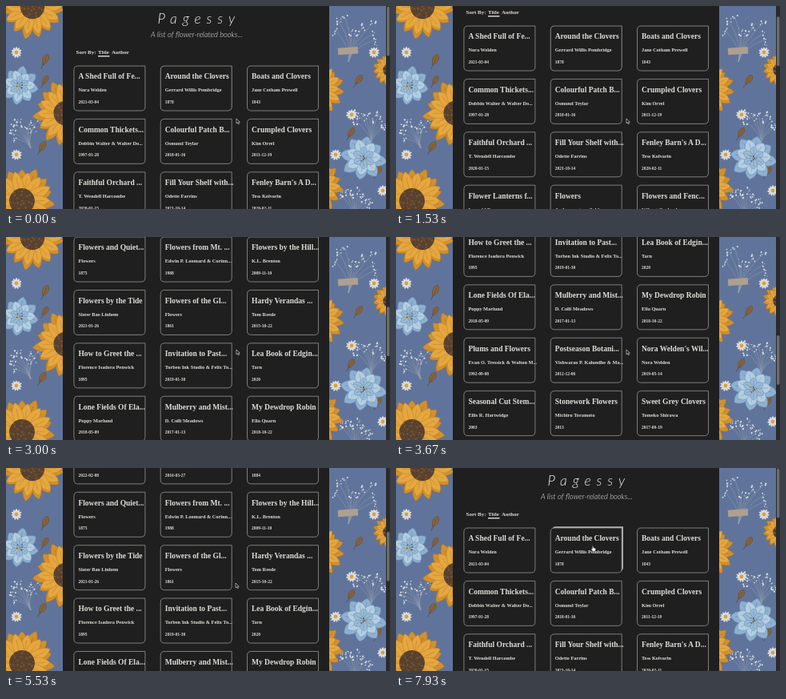
These frames come from a looping animation (480x254 px, 8 s). An HTML page:

```html
<!DOCTYPE html>
<html lang="en">
<head>
<meta charset="utf-8">
<title>Pagessy</title>
<style>
  html, body { margin: 0; width: 100%; height: 100%; overflow: hidden; background: #1f1f1f; }
  svg { display: block; width: 100vw; height: 100vh; }
  text { fill: #dfddd8; font-family: "Liberation Serif", "Noto Serif", serif; font-weight: 700; white-space: pre; }
  .brand, .tag { font-family: Lato, "Open Sans", sans-serif; font-style: italic; font-weight: 300; fill: #f4f4f4; }
  .brand { font-size: 17.5px; letter-spacing: 6.9px; }
  .tag { font-size: 9.4px; }
  .sort { font-size: 7px; }
  .name { font-size: 9.5px; }
  .by { font-size: 6.3px; }
  .date { font-size: 5.5px; }
</style>
</head>
<body>
<svg id="stage" viewBox="0 0 480 254" preserveAspectRatio="none"></svg>
<script>
const NS = "http://www.w3.org/2000/svg";
const LOOP = 8000, STEP = 1000 / 15;
const stage = document.getElementById("stage");

function add(parent, tag, attrs, text) {
  const el = document.createElementNS(NS, tag);
  for (const k in attrs) el.setAttribute(k, attrs[k]);
  if (text) el.textContent = text;
  parent.appendChild(el);
  return el;
}

let seed = 11;
const rnd = () => (seed = (seed * 16807) % 2147483647) / 2147483647;

// ---- wallpaper ----
const wall = add(stage, "g", {});
add(wall, "rect", { width: 480, height: 254, fill: "#60749b" });

function petals(g, n, r, w, fill, line, turn) {
  for (let i = 0; i < n; i++) {
    const len = r * (0.88 + 0.14 * rnd());
    add(g, "path", {
      d: `M0 0C${-w} ${-len * 0.4} ${-w} ${-len * 0.8} 0 ${-len}C${w} ${-len * 0.8} ${w} ${-len * 0.4} 0 0M0 0V${-len * 0.8}`,
      transform: `rotate(${turn + i * 360 / n})`, fill, stroke: line, "stroke-width": 0.5
    });
  }
}
const at = (x, y, turn = 0) => add(wall, "g", { transform: `translate(${x} ${y}) rotate(${turn})` });

function sunflower(x, y, r) {
  const g = at(x, y);
  petals(g, 15, r, r * 0.22, "#d0912f", "#a86a20", 0);
  petals(g, 14, r * 0.9, r * 0.2, "#e5a73f", "#bf7f28", 12);
  add(g, "circle", { r: r * 0.37, fill: "#5d4430" });
  // seeds on a golden-angle spiral
  for (let i = 0; i < 60; i++) {
    const d = r * 0.36 * Math.sqrt(i / 60), a = i * 2.4;
    add(g, "circle", { cx: d * Math.cos(a), cy: d * Math.sin(a), r: 0.65, fill: i % 3 ? "#3f3027" : "#a8742f" });
  }
}
function blueFlower(x, y, r) {
  const g = at(x, y);
  petals(g, 8, r, r * 0.34, "#8fb0d0", "#5d82aa", 10);
  petals(g, 7, r * 0.82, r * 0.3, "#b4cee2", "#7296ba", 35);
  petals(g, 6, r * 0.5, r * 0.2, "#9bbad6", "#6389b0", 0);
  for (let i = 0; i < 12; i++)
    add(g, "circle", { cx: (rnd() - 0.5) * r * 0.35, cy: (rnd() - 0.5) * r * 0.35, r: 0.9, fill: i % 2 ? "#c9ab62" : "#4a5a70" });
}
function daisy(x, y, r) {
  const g = at(x, y);
  petals(g, 11, r, r * 0.22, "#eeece6", "#cfd0d4", 0);
  add(g, "circle", { r: r * 0.34, fill: "#d9a23a" });
}
function leaf(x, y, turn, len) {
  const g = at(x, y, turn);
  petals(g, 1, len, len * 0.32, "#8a6439", "#5f4730", 0);
  add(g, "path", { d: "M0 5V0", stroke: "#5f4730", "stroke-width": 0.7 });
}
function spray(x, y, turn, len) {
  const g = at(x, y, turn);
  for (let i = 0; i < 9; i++) {
    const a = (i - 4) * 0.16, l = len * (0.65 + 0.35 * rnd());
    const tx = Math.sin(a) * l, ty = -Math.cos(a) * l;
    add(g, "path", { d: `M0 0Q0 ${ty * 0.5} ${tx} ${ty}`, fill: "none", stroke: "#98a0ab", "stroke-width": 0.45 });
    for (let k = 0; k < 5; k++)
      add(g, "circle", { cx: tx + (rnd() - 0.5) * 7, cy: ty + (rnd() - 0.3) * 11, r: 0.5 + rnd() * 0.7, fill: "#d9dce0" });
  }
}

spray(31, 178, -22, 38);
leaf(46, 74, 25, 15);
leaf(46, 98, 30, 13);
leaf(42, 182, 30, 15);
sunflower(33, 1, 41);
daisy(13, 58, 7);
blueFlower(17, 100, 25);
sunflower(75, 134, 42);
daisy(13, 186, 7);
sunflower(20, 244, 43);

spray(428, 70, 14, 58);
spray(456, 174, 5, 46);
spray(434, 268, 10, 42);
add(wall, "rect", { x: 415, y: 52, width: 25, height: 8.5, fill: "#ada091", transform: "rotate(-4 427 56)" });
daisy(460, 58, 7);
leaf(437, 98, 35, 14);
leaf(428, 164, 30, 14);
leaf(462, 212, 25, 14);
sunflower(479, 80, 21);
sunflower(388, 104, 35);
daisy(432, 136, 7);
daisy(412, 186, 7);
blueFlower(447, 190, 29);
sunflower(387, 226, 35);
daisy(471, 231, 7);

// ---- page ----
add(stage, "rect", { x: 71, width: 333, height: 254, fill: "#1f1f1f" });
const page = add(stage, "g", {});
const label = (parent, cls, x, y, s) => add(parent, "text", { class: cls, x, y }, s);

label(page, "brand", 189.5, 22, "Pagessy");
label(page, "tag", 181, 38.5, "A list of flower-related books...");
label(page, "sort", 87.5, 60.3, "Sort By:");
label(page, "sort", 115, 60.3, "Title");
label(page, "sort", 132, 60.3, "Author");
add(page, "rect", { x: 115, y: 62.2, width: 14.5, height: 1.2, fill: "#fff" });

const NA = "Authors not available";
const books = `A Shed Full of Fe...|Nora Welden|2021-03-04
Around the Clovers|Gerrard Willis Pembridge|1878
Boats and Clovers|Jane Cotham Prewell|1843
Common Thickets...|Dobbin Walter & Walter Do...|1997-01-28
Colourful Patch B...|Osmund Teylar|2018-01-16
Crumpled Clovers|Kim Orrel|2011-12-19
Faithful Orchard ...|T. Wendell Harcombe|2020-01-15
Fill Your Shelf with...|Odette Farrins|2021-10-14
Fenley Barn's A D...|Tess Kolvarin|2020-02-11
Flower Lanterns f...|Leopold Farnum|2022-02-08
Flowers|${NA}|2016-03-27
Flowers and Fenc...|Wilmot Garland|1884
Flowers and Quiet...|Flowers|1875
Flowers from Mt. ...|Edwin P. Loomard & Corinn...|1988
Flowers by the Hill...|K.L. Brenton|2009-11-10
Flowers by the Tide|Sister Bao Linhem|2021-01-26
Flowers of the Gl...|Flowers|1861
Hardy Verandas ...|Tom Reede|2015-10-22
How to Greet the ...|Florence Isadora Penwick|1895
Invitation to Past...|Torben Ink Studio & Felix To...|2019-01-30
Lea Book of Edgin...|Tarn|2020
Lone Fields Of Ela...|Poppy Marlund|2018-05-09
Mulberry and Mist...|D. Colli Meadows|2017-01-13
My Dewdrop Robin|Ella Quarn|2018-10-22
Plums and Flowers|Evan O. Tressick & Walton M...|1992-09-08
Postseason Botani...|Vishwarao P. Kalundhe & Ma...|2012-12-06
Nora Welden's Wil...|Nora Welden|2019-05-14
Seasonal Cut Stem...|Ellis R. Hartwidge|2003
Stonework Flowers|Michiru Toramoto|2013
Sweet Grey Clovers|Tomeko Shirawa|2017-09-19
The Shelf of the Fr...|Magnus Orland & Petra Win...|2019-04-02
The Slow Art of Pe...|Melanie Torvel|2017-08-22
The Flower Porter...|Nell Dasp|2006-03-15
The Embroidered L...|Edna Kristen Varke|1856
The Grammar and...|${NA}|1867
The Etiquette of Fe...|${NA}|1834`.split("\n");

// rounded everywhere except the top right corner
const CARD = "M5 0H89V51Q89 56 84 56H5Q0 56 0 51V5Q0 0 5 0Z";
let shadow;
books.forEach((line, i) => {
  const [name, by, date] = line.split("|");
  const x = 84.9 + (i % 3) * 108.3, y = 75 + Math.floor(i / 3) * 66.4;
  const g = add(page, "g", { transform: `translate(${x} ${y})` });
  if (i === 1) shadow = add(g, "path", { d: CARD, fill: "#b4b4b4" });
  add(g, "path", { d: CARD, fill: "#1f1f1f", stroke: "#a6a6a6", "stroke-width": 0.7 });
  label(g, "name", 5.5, 16.4, name);
  label(g, "by", 5.5, 32.4, by);
  label(g, "date", 5.5, 47, date);
});

// ---- scrollbar and cursor ----
add(stage, "rect", { x: 475, width: 5, height: 254, fill: "#2a2a2b" });
const thumb = add(stage, "rect", { x: 476, width: 3.4, height: 62, rx: 1.7, fill: "#6d6d6e" });

const cursor = add(stage, "g", {});
const arrow = add(cursor, "path", {
  d: "M0 0V5.8L1.4 4.6L2.4 6.8L3.4 6.3L2.5 4.2H4.3Z", fill: "#111", stroke: "#eee", "stroke-width": 0.6
});
const hand = add(cursor, "path", {
  d: "M-.6 .5Q0 -.4 .6 .5V2.3L3 2.9Q3.8 3.2 3.6 4.2L3 6.6H-.2L-2 4.2Q-2 3.2 -.6 3.9Z",
  fill: "#fff", stroke: "#222", "stroke-width": 0.4
});

// ---- motion ----
const scrollKeys = [
  [200, 0], [870, 4], [1070, 9], [1530, 50], [1600, 50], [2130, 165], [2200, 165], [2600, 283],
  [2800, 283], [3070, 347], [3200, 347], [3670, 480], [3800, 480], [4270, 611],
  [4470, 611], [4600, 613], [5338, 613], [5930, 0]
];
const cursorKeys = [
  [4870, 288, 141], [5000, 287, 144], [6070, 287, 144], [6330, 100, 101],
  [6600, 100, 101], [7000, 140, 58], [7130, 140, 58], [7930, 246, 97.5]
];
const easeOut = p => 1 - Math.pow(1 - p, 1.7);
const smooth = p => p * p * (3 - 2 * p);
const clamp = p => Math.min(1, Math.max(0, p));

function track(keys, t, ease) {
  let i = 0;
  while (i < keys.length - 2 && t >= keys[i + 1][0]) i++;
  const a = keys[i], b = keys[i + 1];
  const p = ease(clamp((t - a[0]) / (b[0] - a[0])));
  return a.slice(1).map((v, k) => v + (b[k + 1] - v) * p);
}

function draw(ms) {
  const t = Math.floor((ms % LOOP + 5) / STEP) * STEP;
  const [y] = track(scrollKeys, t, easeOut);
  const [cx, cy] = track(cursorKeys, t, smooth);
  page.setAttribute("transform", `translate(0 ${-y})`);
  thumb.setAttribute("y", y * 0.255 + 0.5);
  cursor.setAttribute("transform", `translate(${cx} ${cy})`);
  const link = t > 6200 && cy > 74 && (cx < 173 || cx > 193) && cx < 282;
  arrow.setAttribute("visibility", link ? "hidden" : "visible");
  hand.setAttribute("visibility", link ? "visible" : "hidden");
  const lift = 1.8 * clamp((t - 7530) / 300);
  shadow.setAttribute("transform", `translate(${lift} ${-lift})`);
}

const start = performance.now();
function tick() {
  draw(performance.now() - start);
  requestAnimationFrame(tick);
}
tick();
</script>
</body>
</html>
```
